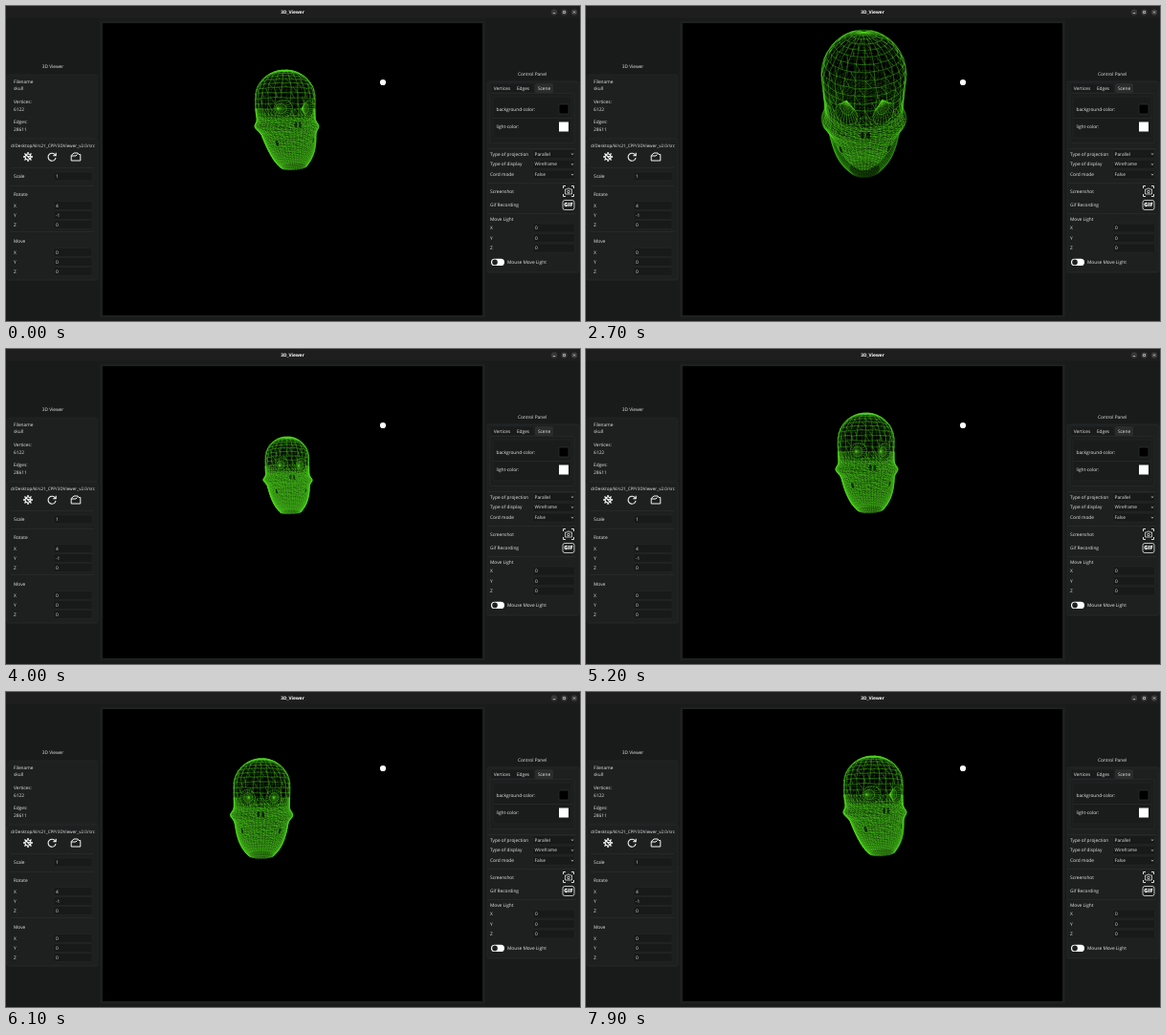
These frames come from a looping animation (600x330 px, 8 s). An HTML page with a canvas:

```html
<!DOCTYPE html>
<html lang="en">
<head>
<meta charset="utf-8">
<title>3D_Viewer</title>
<style>
  html, body { margin: 0; width: 100%; height: 100%; overflow: hidden; background: #191b1b; }
  canvas { display: block; width: 600px; height: 330px; }
</style>
</head>
<body>
<canvas id="stage" width="600" height="330"></canvas>
<script>
const ctx = document.getElementById('stage').getContext('2d');
const LOOP = 8000, STEP = 100, COLS = 56, ROWS = 48;

const lerp = (a, b, k) => a + (b - a) * k;
const ramp = (x, from, to) => Math.min(1, Math.max(0, (x - from) / (to - from)));
const smooth = k => k * k * (3 - 2 * k);

// The skull tilts forward, recedes, swings left, then settles to the right.
function poseAt(t) {
  const tilt = ramp(t, 2200, 2700) - ramp(t, 2800, 3500);
  const recede = ramp(t, 3800, 4000) - ramp(t, 4300, 4700);
  const settle = 1 - (1 - ramp(t, 6000, 6600)) ** 2;
  const swing = ramp(t, 5200, 5800) * (1 - settle);
  const turned = ramp(t, 2200, 2700);
  return {
    x: 293.5 - 3 * tilt + recede - 41.5 * swing + 8.5 * settle,
    width: 67 - 2 * turned + 24 * tilt - 14 * recede + settle,
    top: 67 - 42 * tilt + 25 * recede + 4 * swing,
    bottom: 172 + 8 * tilt + recede + 4 * swing,
    yaw: .36 - .17 * turned - .16 * tilt - .4 * swing + .18 * settle,
    pitch: .05 + .55 * tilt - .1 * recede + .05 * swing
  };
}

// Point on the head: v runs from crown (0) to chin (1), a is the angle from the nose.
function surface(v, a) {
  const dome = Math.sqrt(1 - (1 - Math.min(v, .3) / .3) ** 2);
  const jaw = Math.sqrt(1 - ramp(v, .3, 1.05) ** 2.5);
  const cheek = .13 * Math.exp(-(((v - .61) / .045) ** 2));
  const front = -.1 + 1.05 * dome;
  const back = -.1 - dome + 1.5 * smooth(ramp(v, .4, .95));
  return [
    (.96 * jaw * dome + cheek) * Math.sin(a),
    1.6 - 3.2 * v,
    (front + back) / 2 + (front - back) / 2 * Math.cos(a)
  ];
}

const openings = [
  { a: .43, v: .42, ra: .27, rv: .08, depth: .5 },
  { a: .07, v: .57, ra: .06, rv: .035, depth: 0 },
  { a: .75, v: .74, ra: .09, rv: .03, depth: 0 }
].flatMap(o => [o, { ...o, a: -o.a }]);

const inOpening = (v, a) =>
  openings.some(o => ((a - o.a) / o.ra) ** 2 + ((v - o.v) / o.rv) ** 2 < 1);

// Repeatable noise in -.5 to .5
const noise = (i, j) => {
  const n = Math.sin(i * 127.1 + j * 311.7) * 43758.5;
  return n - Math.floor(n) - .5;
};

const mesh = [];
for (let i = 0; i <= ROWS; i++) {
  const u = i / ROWS, row = [];
  const height = u < .3 ? .5 * (1 - Math.cos(Math.PI / 2 * u / .3)) : .5 + .5 * (u - .3) / .7;
  const rough = Math.min(1, height * 4, (1 - height) * 4);
  for (let j = 0; j <= COLS; j++) {
    const v = height + rough * noise(i, j % COLS) * .008;
    const a = 2 * Math.PI * (j + rough * noise(j % COLS, i) * .5) / COLS - Math.PI;
    row.push({ v, a, p: surface(v, a) });
  }
  mesh.push(row);
}

const edges = [];
function addEdge(from, to) {
  const v = (from.v + to.v) / 2, a = (from.a + to.a) / 2;
  if (!inOpening(v, a)) edges.push({ from: from.p, to: to.p, v, a });
}
for (let i = 0; i < ROWS; i++) for (let j = 0; j < COLS; j++) {
  const point = mesh[i][j], dense = point.v > .4;
  addEdge(point, mesh[i][j + 1]);
  if (dense || j % 2 === 0) addEdge(point, mesh[i + 1][j]);
  if (dense || (i + j) % 4 === 0) addEdge(point, mesh[i + 1][j + 1]);
}
for (const { a, v, ra, rv, depth } of openings) {
  const centre = surface(v, a);
  centre[2] -= depth;
  const ring = (k, inset) => {
    const angle = k * Math.PI / 10;
    return surface(v + rv * Math.sin(angle), a + ra * Math.cos(angle))
      .map((c, axis) => lerp(c, centre[axis], inset));
  };
  for (let k = 0; k < 20; k++) {
    edges.push({ from: ring(k, 0), to: ring(k + 1, 0), v, a });
    if (depth) {
      edges.push({ from: ring(k, 0), to: centre, v, a });
      edges.push({ from: ring(k, .4), to: ring(k + 1, .4), v, a });
    }
  }
}

function drawSkull(time) {
  const { x: cx, width, top, bottom, yaw, pitch } = poseAt(time);
  const cy = Math.cos(yaw), sy = Math.sin(yaw), cp = Math.cos(pitch), sp = Math.sin(pitch);
  const project = ([x, y, z]) => {
    const depth = z * cy - x * sy, zoom = 1 / (1 - .18 * (depth * cp + y * sp));
    return [(x * cy + z * sy) * zoom, (depth * sp - y * cp) * zoom];
  };
  const points = mesh.flat().map(m => project(m.p));
  const xs = points.map(p => p[0]), ys = points.map(p => p[1]);
  const x0 = Math.min(...xs), x1 = Math.max(...xs), y0 = Math.min(...ys), y1 = Math.max(...ys);
  const place = p => {
    const [x, y] = project(p);
    return [cx + width * (ramp(x, x0, x1) - .5), lerp(top, bottom, ramp(y, y0, y1))];
  };
  const near = new Path2D(), far = new Path2D();
  for (const e of edges) {
    const facing = Math.cos(e.a + yaw) * cp + 3 * (.4 - e.v) * sp;
    const path = facing > -.05 ? near : far;
    path.moveTo(...place(e.from));
    path.lineTo(...place(e.to));
  }
  ctx.lineWidth = .5;
  ctx.strokeStyle = 'rgba(70,200,28,.3)';
  ctx.stroke(far);
  ctx.strokeStyle = 'rgba(80,215,34,.75)';
  ctx.stroke(near);
}

function text(str, x, y, { align = 'left', weight = 500, size = 4.8, color = '#e6e6e6' } = {}) {
  ctx.font = `${weight} ${size}px "Open Sans", sans-serif`;
  ctx.textRendering = 'geometricPrecision';
  ctx.textAlign = align;
  ctx.textBaseline = 'middle';
  ctx.fillStyle = color;
  ctx.fillText(str, x, y + .3);
}
function box(x, y, w, h, fill, border, r = 1.5) {
  ctx.beginPath();
  ctx.roundRect(x, y, w, h, r);
  ctx.fillStyle = fill;
  ctx.fill();
  if (border) {
    ctx.strokeStyle = border;
    ctx.lineWidth = .7;
    ctx.stroke();
  }
}
function disc(x, y, r, color) {
  ctx.beginPath();
  ctx.arc(x, y, r, 0, 7);
  ctx.fillStyle = color;
  ctx.fill();
}
function lines(d, x, y, width = 1) {
  ctx.save();
  ctx.translate(x, y);
  ctx.strokeStyle = '#f2f2f2';
  ctx.lineWidth = width;
  ctx.stroke(new Path2D(d));
  ctx.restore();
}
function rule(x, y, w) {
  ctx.fillStyle = '#2b2d2d';
  ctx.fillRect(x, y, w, .7);
}
function field(label, value, x, y, fx, w) {
  text(label, x, y);
  box(fx, y - 4.5, w, 9, '#181919', '#252727');
  text(value, fx + 2, y);
}
function axes(values, x, y, fx, w, gap) {
  values.forEach((value, i) => field('XYZ'[i], value, x, y + i * gap, fx, w));
}

function drawLeft() {
  text('3D Viewer', 49, 63, { align: 'center' });
  box(1, 72, 95, 66, '#1e2020', '#252727');
  ['Filename', 'skull', 'Vertices:', '6122', 'Edges:', '28611'].forEach((s, i) =>
    text(s, 8, 79 + (i >> 1) * 21.2 + i % 2 * 7.8));
  box(1, 139, 95, 148, '#1e2020', '#292b2b');
  text('d/Desktop/kl/s21_CPP/3DViewer_v2.0/src', 5, 146, { size: 4.6 });
  for (let i = 0; i < 8; i++) {
    const c = Math.cos(i * Math.PI / 4), s = Math.sin(i * Math.PI / 4);
    lines(`M${c * 3} ${s * 3}L${c * 5} ${s * 5}`, 23, 158, 1.4);
  }
  lines('M-3 0A3 3 0 1 1 3 0A3 3 0 1 1 -3 0M-2 -2L2 2M0 0L2.5 -1', 23, 158, 1.2);
  lines('M3.6 -1.6A4 4 0 1 0 4 1M4.2 -4.2V-1.2H1.2', 48, 158, 1.1);
  lines('M-4.8 4V-1.5L-2 -4H2L3 -2.5H4.8V4ZM-4.8 -1H0L1.5 -2.5', 73, 158);
  rule(5, 169, 87);
  field('Scale', '1', 8, 178.5, 50, 40);
  rule(5, 188, 87);
  text('Rotate', 8, 197);
  axes(['4', '-1', '0'], 8, 209, 50, 40, 10);
  rule(5, 236, 87);
  text('Move', 8, 246);
  axes(['0', '0', '0'], 8, 258, 50, 40, 10);
}

function drawRight() {
  text('Control Panel', 550, 71, { align: 'center' });
  box(503, 79, 96, 200, '#1e2020', '#292b2b');
  box(507, 81, 45, 10, '#191b1b', '#252727');
  box(553, 81, 19, 10, '#2b2d2d');
  ['Vertices', 'Edges', 'Scene'].forEach((s, i) => text(s, 518.5 + i * 22, 86.3, { align: 'center' }));
  box(506, 91.5, 88, 52, '#1c1e1e', '#292b2b');
  box(509, 95, 82, 43, '#1a1c1c', '#252727');
  rule(509, 117, 82);
  text('background-color:', 512.5, 108.3);
  box(578, 103, 10, 10, '#000', '#333', 0);
  text('light-color:', 512.5, 126.7);
  box(578, 121.5, 10, 10, '#fff', null, 0);
  rule(504, 149, 92);
  [['Type of projection', 'Parallel'], ['Type of display', 'Wireframe'], ['Cord mode', 'False']].forEach(([label, value], i) => {
    const y = 155 + i * 10.8;
    field(label, value, 506, y, 550.5, 44);
    lines('M-1.2 -.5L0 .6L1.2 -.5', 592, y, .7);
  });
  rule(504, 185, 92);
  text('Screenshot', 506, 194);
  lines('M-5.5 -3V-5.5H-3M3 -5.5H5.5V-3M5.5 3V5.5H3M-3 5.5H-5.5V3', 588, 194, .9);
  lines('M-3.5 -2H-1.5L-.8 -3H.8L1.5 -2H3.5V3H-3.5ZM-1.3 .5A1.3 1.3 0 1 1 1.3 .5A1.3 1.3 0 1 1 -1.3 .5', 588, 194, .7);
  text('Gif Recording', 506, 208.5);
  box(582, 203.5, 12, 10, '#1e2020', '#fff', 2);
  text('GIF', 588, 208.5, { align: 'center', weight: 800, size: 5.8, color: '#fff' });
  rule(504, 217, 92);
  text('Move Light', 506, 223);
  axes(['0', '0', '0'], 506, 232.5, 551, 43.5, 10.6);
  box(507, 264.7, 14, 7.4, '#fff', null, 3.7);
  disc(511, 268.4, 2.8, '#1e2020');
  text('Mouse Move Light', 524, 268.3);
}

function drawWindow() {
  box(0, 0, 600, 330, '#191b1b', null, 0);
  box(0, 0, 600, 12.5, '#1e1e1e', null, 0);
  text('3D_Viewer', 299.5, 6.5, { align: 'center', weight: 700, color: '#fff' });
  ['M-1.2 1H1.2', 'M-1 -1H1V1H-1Z', 'M-1.1 -1.1L1.1 1.1M1.1 -1.1L-1.1 1.1'].forEach((d, i) => {
    disc(573 + i * 10.5, 6.5, 3.2, '#383838');
    lines(d, 573 + i * 10.5, 6.5, .6);
  });
  box(98, 15.5, 403, 311, '#1e2020', null, 0);
  drawLeft();
  drawRight();
}

function drawView(time) {
  ctx.fillStyle = '#000';
  ctx.fillRect(101, 18, 397, 306);
  drawSkull(time);
  disc(394, 80, 3.1, '#fff');
}

let shown = -1;
function frame() {
  const time = Math.floor(performance.now() % LOOP / STEP) * STEP;
  if (time !== shown) {
    drawView(time);
    shown = time;
  }
  requestAnimationFrame(frame);
}
drawWindow();
frame();
</script>
</body>
</html>
```
